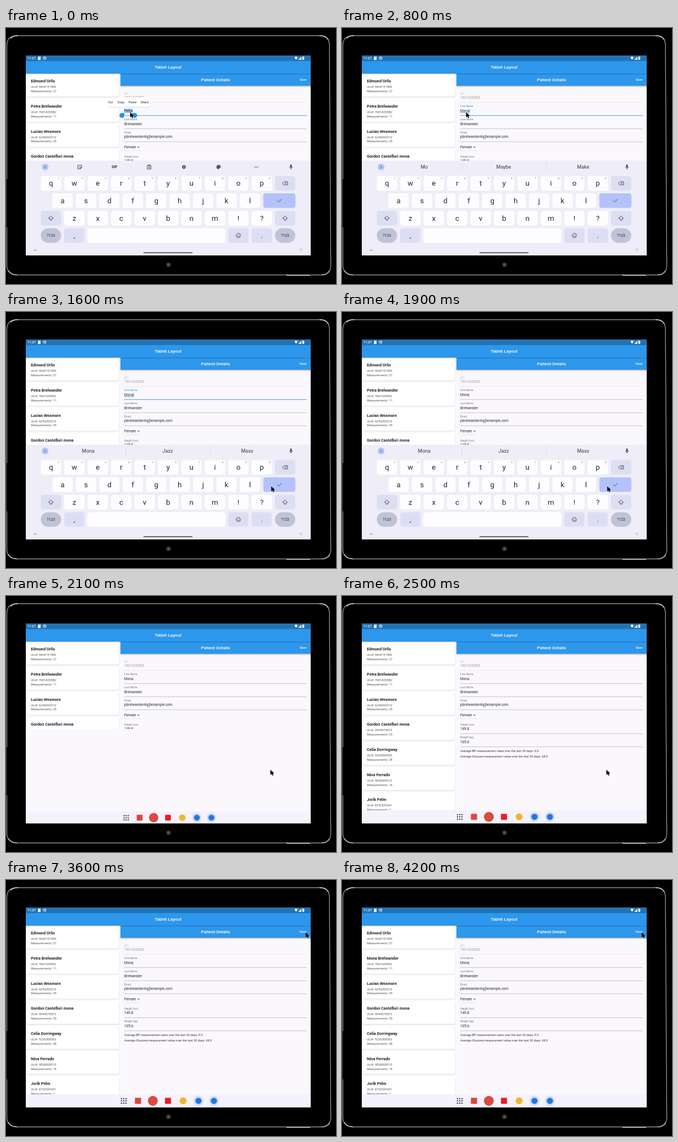
Recreate the animation shown at these times as an HTML page. Size 600 by 466 pixels, loop 4300 ms.

```html
<!DOCTYPE html>
<html lang="en">
<head>
<meta charset="utf-8">
<title>Tablet layout</title>
<style>
  html, body { margin: 0; width: 100%; height: 100%; overflow: hidden; background: #000; }
  svg { display: block; width: 600px; height: 466px; }
  text { font-family: Roboto, sans-serif; white-space: pre; }
  .ink { fill: none; stroke: #45464f; stroke-width: .9; stroke-linecap: round; stroke-linejoin: round; }
</style>
</head>
<body>
<svg viewBox="0 0 600 466">
  <defs>
    <linearGradient id="shade" x2="0" y2="1">
      <stop stop-color="#000" stop-opacity=".32"/>
      <stop offset="1" stop-color="#000" stop-opacity="0"/>
    </linearGradient>
    <clipPath id="screen"><path d="M36 50H554V414H36Z"/></clipPath>
    <clipPath id="content"><rect id="view" x="36" y="83" width="518" height="159"/></clipPath>
  </defs>

  <!-- tablet body -->
  <g fill="none" stroke="#8d8f8e">
    <path d="M1.5 275V32Q1.5 14 20 14H571Q587 14 588 30L590.5 432Q590.5 449 574 449.5H20Q2 449 1.5 432V363" stroke-width="1.4"/>
    <path d="M1 275V363" stroke="#4c4e4d"/>
    <path d="M510 450.3H553" stroke="#c4c6c5" stroke-width="1.6"/>
    <path d="M8 19Q12 14 22 14M570 14Q583 14 586 22M588 442Q584 449 574 449.5M4 441Q8 449 20 449.5" stroke="#c9cbca" stroke-width="1.4"/>
  </g>
  <circle cx="295.5" cy="431" r="3.4" fill="#2b2c2e" stroke="#5d5e60"/>
  <circle cx="295.5" cy="431" r="1.3" fill="#77797c"/>

  <g clip-path="url(#screen)">
    <path d="M36 50H554V414H36Z" fill="#faf8fc"/>
    <g clip-path="url(#content)">
      <g id="list"></g>
      <g id="form"></g>
    </g>

    <!-- bars -->
    <path d="M208 105H554V108H208Z" fill="url(#shade)"/>
    <path d="M208 83H554V105H208Z" fill="#2d97ec"/>
    <path d="M36 82.5H554V85H36Z" fill="url(#shade)"/>
    <path d="M36 60H554V83H36Z" fill="#2d97ec"/>
    <path d="M36 50H554V60.3H36Z" fill="#2273b3"/>
    <g id="titles"></g>
    <g fill="#fff">
      <path d="M59.7 52H62.7V58.2H58V53.7Z"/>
      <path d="M524.3 53.4Q527.5 50.9 530.7 53.4L527.5 57.8ZM537 52.2V57.8H531.4ZM538.8 52.6H539.7V52H541.3V52.6H542.2V58H538.8Z"/>
      <path d="M68 54.4H72.6" stroke="#fff" stroke-width=".9"/>
      <circle cx="70.3" cy="55" r="2.5" fill="none" stroke="#fff" stroke-width=".9"/>
    </g>

    <g id="dock">
      <path d="M0 390.5H600V420H0Z" fill="#f4f2fc"/>
      <g id="apps"></g>
    </g>

    <g id="keyboard">
      <path d="M36 241.5H554V414H36Z" fill="#efedf7"/>
      <g id="keys"></g>
      <g id="tools"></g>
      <path d="M250 409H339" stroke="#3c3c42" stroke-width="1.7"/>
      <path d="M51.3 403.4L53.2 405.3L55.1 403.4" class="ink" stroke-width=".7"/>
      <path d="M533 402.5H539M533.5 404.3H538.5M535 406.3H537" stroke="#c3c2cc" stroke-width=".9"/>
    </g>

    <g id="popup" data-on="0-300">
      <rect x="181.5" y="127.2" width="84.5" height="17.6" rx="8.8" fill="#000" opacity=".12"/>
      <rect x="181" y="126.2" width="85" height="17.6" rx="8.8" fill="#fff"/>
      <path d="M215 155V159A4.4 4.4 0 1 1 210.6 154.7H215ZM229.7 154.7H234.2A4.4 4.4 0 1 1 229.7 159Z" fill="#2491ea"/>
    </g>
    <path id="mouse" d="M0 0L.2 10L2.5 8.1L4 11.2L5.9 10.3L4.5 7.4L7.3 6.8Z" fill="#000" stroke="#fff" stroke-opacity=".5" stroke-width=".5"/>
  </g>
</svg>

<script>
const LOOP = 4300, STEP = 100;
const $ = id => document.getElementById(id);
const add = (id, markup) => $(id).insertAdjacentHTML('beforeend', markup);
const text = (x, y, size, str, attrs = '') =>
  `<text x="${x}" y="${y}" font-size="${size}" ${attrs}>${str}</text>`;
const rect = (x, y, w, h, fill, r = 0) =>
  `<rect x="${x}" y="${y}" width="${w}" height="${h}" rx="${r}" fill="${fill}"/>`;
const line = (x1, x2, y, color, w = .5, attrs = '') =>
  `<path d="M${x1} ${y}H${x2}" stroke="${color}" stroke-width="${w}" ${attrs}/>`;
const during = (range, markup) => `<g data-on="${range}">${markup}</g>`;
const MID = 'text-anchor="middle"';

// patient list
const NEW_NAME = 'Mona', SURNAME = 'Brelwander';
const patients = [
  ['Edmund Orlis', '4043137400', 27],
  ['Petra ' + SURNAME, '7601628582', 11],
  ['Lucian Wexmore', '6245200210', 25],
  ['Gordon Castelluri mona', '0944079873', 25],
  ['Celia Dorringway', '9226568553', 28],
  ['Nina Ferrado', '9828008513', 16],
  ['Jorik Pelm', '8792539041', 7]
];
patients.forEach(([name, uli, count], i) => {
  const y = 83.4 + i * 45.7;
  const title = n => text(45.3, y + 15.7, 7.29, n, 'font-weight="700" fill="#222"');
  add('list',
    rect(38, y + .9, 167.4, 41.6, '#d9d8dc', 1.4) + rect(38, y, 167, 41.6, '#fff', 1.4) +
    (i === 1
      ? during('0-3700', title(name)) + during('3700-4300', title(`${NEW_NAME} ${SURNAME}`))
      : title(name)) +
    text(45.3, y + 25.7, 5.6, 'ULI#: ' + uli, 'fill="#555"') +
    text(45.3, y + 33.6, 5.6, 'Measurements: ' + count, 'fill="#555"'));
});

// details form
const label = (y, str, color = '#757575') => text(215, y, 4.8, str, `fill="${color}"`);
const value = (y, str, color = '#2a2a2a') => text(215, y, 6.48, str, `fill="${color}"`);
const field = (y, name, val) =>
  label(y, name) + value(y + 8.5, val) + line(215, 547, y + 15.2, '#8c8c8c');

add('form',
  label(120.7, 'ULI', '#b5b5b5') + value(129.2, '7601628582', '#a3a3a3') +
  line(215, 547, 135.4, '#b5b5b5', .5, 'stroke-dasharray=".8 .8"') +
  during('0-1700', label(144.2, 'First Name', '#2d97ec') + line(215, 547, 159.4, '#2d97ec', .9)) +
  during('1700-4300', label(144.2, 'First Name') + line(215, 547, 159.4, '#8c8c8c')) +
  during('0-300', rect(215, 147, 15, 7.6, '#9dc9ee') + value(152.8, 'Petra')) +
  `<g id="typed">${value(152.8, '')}</g>` +
  during('300-1700', '<path id="compose" stroke="#333" stroke-width=".5"/>') +
  '<path id="caret" stroke="#2d97ec" stroke-width=".8"/>' +
  field(168.2, 'Last Name', SURNAME) +
  field(191.9, 'Email', 'pbrelwander4q@example.com') +
  value(219.3, 'Female') + line(215, 245, 223.2, '#c8c8c8', .4) +
  '<path d="M238.8 216H243L240.9 218.2Z" fill="#666"/>' +
  field(235.5, 'Height (cm)', '149.8') +
  field(259.3, 'Weight (kg)', '105.6') +
  text(215, 283.9, 5.64, 'Average BP measurement value over the last 30 days: 0.0', 'fill="#333"') +
  text(215, 294.3, 5.64, 'Average Glucose measurement value over the last 30 days: 68.0', 'fill="#333"'));

const white = 'fill="#fff" font-weight="500"';
add('titles',
  text(39, 57.4, 5.9, '11:27', white) +
  text(294.5, 74.3, 8.1, 'Tablet Layout', `${white} ${MID}`) +
  text(381, 96.9, 8.1, 'Patient Details', `${white} ${MID}`) +
  text(534, 96, 5.67, 'Save', white));

[['Cut', 190], ['Copy', 209], ['Paste', 230], ['Share', 252]].forEach(([s, x]) =>
  add('popup', text(x, 137.1, 5.67, s, `${MID} fill="#222"`)));

// keyboard
const PITCH = 42.6, KEY_H = 26.6, SOFT = '#dcdff4', PILL = '#bfc3da', ACCENT = '#b3c2fa';
const rowY = [269.4, 301, 332.8, 364.4];
const key = (x, row, str = '', fill = '#fdfdff', w = 37, r = 4.2, size = 13.4) =>
  rect(x - w / 2, rowY[row], w, KEY_H, fill, r) +
  text(x, rowY[row] + 13.3 + size * .33, size, str, `${MID} fill="#25262c"`);
const icon = (x, y, d) => `<path class="ink" transform="translate(${x} ${y})" d="${d}"/>`;
const rowOf = (chars, x0, row) =>
  [...chars].map((c, i) => key(x0 + i * PITCH, row, c)).join('');
const SHIFT = 'M0 -4L4.2 .3H2V3.3H-2V.3H-4.2Z';

add('keys',
  rowOf('qwertyuiop', 81.7, 0) +
  [...'1234567890'].map((d, i) => text(95.8 + i * PITCH, 274.6, 4.4, d, `${MID} fill="#55565e"`)).join('') +
  key(507.5, 0, '', SOFT) + icon(507.5, 282.7, 'M-4.6 0L-2 -3H4.4V3H-2ZM-.3 -1.3L2.3 1.3M2.3 -1.3L-.3 1.3') +
  rowOf('asdfghjkl', 102.8, 1) +
  key(497, 1, '', ACCENT, 58.4) + icon(497, 314.3, 'M-3.6 .2L-1.2 2.6L3.8 -2.6') +
  key(81.7, 2, '', SOFT) + icon(81.7, 346.2, SHIFT) +
  rowOf('zxcvbnm!?', 81.7 + PITCH, 2) +
  key(507.5, 2, '', SOFT) + icon(507.5, 346.2, SHIFT) +
  key(81.7, 3, '?123', PILL, 37, 13.3, 7) +
  key(124.2, 3, ',', SOFT) +
  key(273.4, 3, '', '#fdfdff', 251) +
  key(422.4, 3, '', SOFT) +
  icon(422.4, 377.7, 'M-4 0A4 4 0 1 1 4 0A4 4 0 1 1 -4 0M-1.4 -1.2V-1M1.4 -1.2V-1M-2 1.2Q0 3.2 2 1.2') +
  key(465, 3, '.', SOFT) +
  key(507.5, 3, '?123', PILL, 37, 13.3, 7));

const gear = Array.from({ length: 8 }, (_, i) => {
  const a = i * Math.PI / 4, c = Math.cos(a), s = Math.sin(a);
  return `M${2.4 * c} ${2.4 * s}L${3.4 * c} ${3.4 * s}`;
}).join('');
const dot = (x, y, r, fill) => `<circle cx="${x}" cy="${y}" r="${r}" fill="${fill}"/>`;
const words = list => list.map((s, i) =>
  text(149.5 + i * 144.5, 256.4, 9, s, `${MID} fill="#3a3b43"`)).join('');

add('tools',
  dot(71, 253, 6.1, ACCENT) +
  during('0-500',
    icon(71, 253, 'M.9 -1.9L-1 0L.9 1.9') +
    icon(134.3, 253, 'M-3.4 -3.4H3.4V1L1 3.4H-3.4ZM3.4 1H1V3.4M-1.3 -1V-.8M1.3 -1V-.8M-1.5 .9Q0 2 1 .9') +
    text(197.4, 255.4, 6.8, 'GIF', `${MID} font-weight="700" fill="#33343b"`) +
    icon(260.4, 253, 'M-3.1 -3H3.1V4H-3.1ZM-1.3 -3.8H1.3V-2.2H-1.3ZM-1.4 0H1.4M-1.4 1.8H1.4') +
    `<g transform="translate(323.5 253)"><path d="${gear}" stroke="#33343b" stroke-width="1.5"/>
      <circle r="2" fill="none" stroke="#33343b" stroke-width="1.5"/></g>` +
    dot(386.6, 253, 3.8, '#33343b') +
    [[-2, 0], [-1, -1.9], [1.1, -1.9], [2.2, 0]].map(([x, y]) => dot(386.6 + x, 253 + y, .65, '#efedf7')).join('') +
    dot(388.3, 255.6, 1.3, '#efedf7') +
    [-2.7, 0, 2.7].map(x => dot(455 + x, 253, .85, '#33343b')).join('')) +
  during('500-4300',
    icon(71, 253, 'M-.9 -1.9L1 0L-.9 1.9') +
    '<path d="M218.5 247V259M371.5 247V259" stroke="#d0cfda" stroke-width=".6"/>') +
  during('500-900', words(['Mo', 'Maybe', 'Make'])) +
  during('900-4300', words([NEW_NAME, 'Jazz', 'Mass'])) +
  rect(516.8, 248.6, 2.6, 5.4, '#33343b', 1.3) +
  icon(518.1, 253, 'M-2.7 -.2Q-2.5 2.4 0 2.4Q2.5 2.4 2.7 -.2M0 2.4V4'));

// dock
for (let i = 0; i < 9; i++)
  add('apps', dot(210 + i % 3 * 4.1, 398 + Math.floor(i / 3) * 4.1, 1.25, '#45464f'));
const ringed = x => `<circle cx="${x}" cy="402" r="7.2" fill="#2a74dc" stroke="#c9dcf6" stroke-width="3.2"/>`;
add('apps',
  rect(234.4, 396.4, 11.2, 11.2, '#e2443a', 1) +
  dot(267, 402, 9, '#dc4a3d') +
  rect(289, 396.5, 11, 11, '#ee1c24', 1) +
  dot(322, 402, 6.2, '#f3b52d') +
  ringed(350) + ringed(378));

// motion
const path = [
  [0, 225.5, 153], [800, 225.5, 153], [1200, 443, 317], [1500, 482, 317], [1900, 482, 317],
  [2100, 480.5, 316], [2500, 480.5, 316], [3100, 536.5, 135], [3500, 544.5, 95], [LOOP, 544.5, 95]
];
const ease = p => p * p * (3 - 2 * p);
function mouseAt(t) {
  const i = path.findIndex((p, n) => n && t < p[0]);
  const [t0, x0, y0] = path[i - 1], [t1, x1, y1] = path[i];
  const p = ease((t - t0) / (t1 - t0));
  return [x0 + (x1 - x0) * p, y0 + (y1 - y0) * p];
}

const strokes = [300, 500, 600, 700];
const typed = $('typed').firstElementChild;
const timed = [...document.querySelectorAll('[data-on]')].map(el => [el, ...el.dataset.on.split('-').map(Number)]);
const show = (el, on) => { el.style.display = on ? '' : 'none'; };

function draw(t) {
  timed.forEach(([el, from, to]) => show(el, t >= from && t < to));

  typed.textContent = NEW_NAME.slice(0, strokes.filter(s => t >= s).length);
  const end = 215 + typed.getComputedTextLength();
  $('compose').setAttribute('d', `M215 154.2H${end}`);
  $('caret').setAttribute('d', `M${end + .6} 147V154.5`);
  show($('caret'), t >= 300 && t < 1700 && (t < 1100 || t >= 1600));

  show($('keyboard'), t < 2100);
  $('keyboard').setAttribute('transform', `translate(0 ${t < 2000 ? 0 : 90})`);
  $('view').setAttribute('height', t < 2200 ? 159 : 307.5);

  show($('dock'), t >= 2100);
  $('dock').setAttribute('transform',
    t < 2200 ? 'translate(294.5 403.5) scale(.946) translate(-294.5 -402)' : '');

  $('mouse').setAttribute('transform', `translate(${mouseAt(t)})`);
}

const start = performance.now();
function tick() {
  const t = (performance.now() - start) % LOOP;
  draw(Math.floor(t / STEP) * STEP);
  requestAnimationFrame(tick);
}
tick();
</script>
</body>
</html>
```
